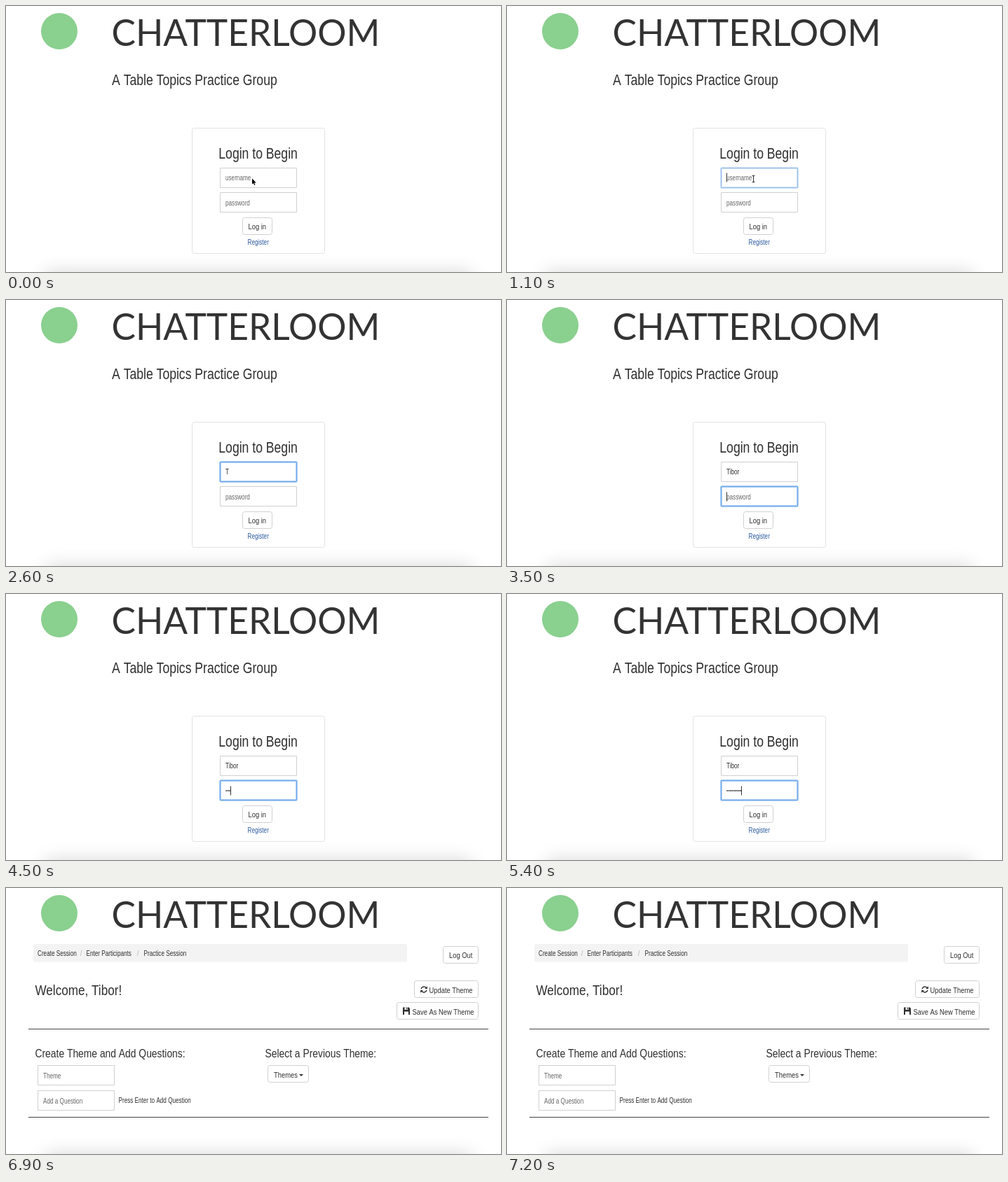
Write an HTML page with a canvas that moves like this. It is 706x380 px and loops after 8 s.

```html
<!DOCTYPE html>
<html lang="en">
<head>
<meta charset="utf-8">
<title>Login demo</title>
<style>
  html, body { margin: 0; width: 100%; height: 100%; overflow: hidden; background: #fff; }
  canvas { display: block; }
</style>
</head>
<body>
<canvas id="stage" width="706" height="380"></canvas>
<script>
const ctx = document.getElementById('stage').getContext('2d');
const LOOP = 8000, NARROW = 0.815, NAME = 'Tibor';
const INK = '#2f2f2f', GREY = '#666', BORDER = '#d0d0d0';
const USER_FIELD = [305.5, 231.5, 109, 28], PASS_FIELD = [305.5, 266.5, 109, 28];
const LOGIN_BUTTON = [337.5, 302.5, 42, 24];
const DOT_STEP = 2.36;
const dotTimes = [4100, 4400, 4500, 4600, 4700, 4800, 5100, 5400, 5400, 5600, 5600];

// The page uses one condensed face, so all body text shares one width factor.
function text(str, x, y, size = 10, color = INK) {
  ctx.save();
  ctx.translate(x, y);
  ctx.scale(NARROW, 1);
  ctx.font = `${size}px "Liberation Sans", Arial, sans-serif`;
  ctx.fillStyle = color;
  ctx.fillText(str, 0, 0);
  const width = ctx.measureText(str).width * NARROW;
  ctx.restore();
  return width;
}

function box([x, y, w, h], { fill = '#fff', stroke = BORDER, radius = 0, line = 1 } = {}) {
  ctx.beginPath();
  ctx.roundRect(x, y, w, h, radius);
  if (fill) { ctx.fillStyle = fill; ctx.fill(); }
  if (stroke) { ctx.strokeStyle = stroke; ctx.lineWidth = line; ctx.stroke(); }
}

function focusRing(rect, alpha = 1) {
  ctx.globalAlpha = alpha;
  box(rect, { fill: null, stroke: '#bcd8f8', radius: 1.5, line: 3 });
  box(rect, { fill: null, stroke: '#74abea', radius: 1, line: 1.4 });
  ctx.globalAlpha = 1;
}

function button(label, rect, textX, textY, fill) {
  box(rect, { radius: 3, fill });
  text(label, textX, textY, 11.5);
}

function path(points, fill, stroke) {
  ctx.beginPath();
  points.forEach(([x, y]) => ctx.lineTo(x, y));
  ctx.closePath();
  if (stroke) { ctx.strokeStyle = stroke; ctx.lineWidth = 1.4; ctx.stroke(); }
  ctx.fillStyle = fill;
  ctx.fill();
}

function rect(x, y, w, h, color = INK) {
  ctx.fillStyle = color;
  ctx.fillRect(x, y, w, h);
}

const caret = (x, y) => rect(x, y, 1, 13, '#333');

function arrow(x, y) {
  path([[0, 0], [0, 8.2], [1.9, 6.5], [3.2, 9.4], [4.4, 8.9], [3.2, 6], [5.8, 6]]
    .map(([dx, dy]) => [x + dx, y + dy]), '#000', '#fff');
}

function iBeam(x, y) {
  rect(x, y, 1, 9);
  rect(x - 1.5, y - 0.5, 4, 1);
  rect(x - 1.5, y + 8.5, 4, 1);
}

function header() {
  rect(0, 0, 706, 380, '#fff');
  ctx.fillStyle = '#8ad08f';
  ctx.beginPath();
  ctx.arc(76, 36, 26, 0, 7);
  ctx.fill();
  ctx.font = '51.5px Lato, sans-serif';
  ctx.fillStyle = '#333';
  ctx.fillText('CHATTERLOOM', 150.5, 56.5);
}

function bottomShadow() {
  ctx.save();
  ctx.shadowColor = 'rgba(0,0,0,.16)';
  ctx.shadowBlur = 26;
  rect(56, 380, 608, 60, '#fff');
  ctx.restore();
}

function userField(t) {
  box(USER_FIELD);
  const focused = t >= 1100 && t < 3500;
  if (focused) focusRing(USER_FIELD, t < 1200 ? 0.5 : 1);
  const typed = t < 2100 ? 0 : t < 2700 ? 1 : Math.min(5, Math.floor((t - 2500) / 100));
  const width = typed ? text(NAME.slice(0, typed), 313, 249) : 0;
  if (!typed) text('username', 313, 249, 10, GREY);
  const blinkOff = (t >= 1600 && t < 2100) || (t >= 2600 && t < 2700);
  if (focused && !blinkOff) caret(313 + Math.round(width), 238.5);
  if (t < 1100) arrow(351, 246.5);
  else if (t < 2000) iBeam(351, 242.5);
}

function passField(t) {
  box(PASS_FIELD);
  const focused = t >= 3500 && t < 6100;
  if (focused) focusRing(PASS_FIELD);
  const dots = dotTimes.filter(time => t >= time).length;
  if (!dots) text('password', 313, 284.5, 10, GREY);
  for (let i = 0; i < dots; i++) {
    ctx.fillStyle = INK;
    ctx.beginPath();
    ctx.arc(314.2 + i * DOT_STEP, 281, 0.9, 0, 7);
    ctx.fill();
  }
  if (focused && !(t >= 4000 && t < 4100)) caret(Math.floor(313 + dots * DOT_STEP), 274.5);
}

function loginPage(t) {
  text('A Table Topics Practice Group', 151, 112.5, 21.6);
  box([265.5, 174.5, 189, 179], { stroke: '#e2e2e2', radius: 3 });
  text('Login to Begin', 303.3, 218, 21.6);
  userField(t);
  passField(t);
  const pressed = t >= 6100;
  button('Log in', LOGIN_BUTTON, 345.5, 319, pressed ? '#e6e6e6' : '#fff');
  if (pressed) focusRing(LOGIN_BUTTON);
  text('Register', 344.5, 341, 10, '#2c5aa0');
}

function refreshIcon(x, y) {
  ctx.strokeStyle = INK;
  ctx.lineWidth = 1.4;
  for (const side of [1, -1]) {
    const turn = side > 0 ? 0 : Math.PI;
    ctx.beginPath();
    ctx.arc(x, y, 4, turn + 3.4, turn + 5.7);
    ctx.stroke();
    path([[4.9, -4.8], [4.9, -0.9], [1.2, -0.9]].map(([dx, dy]) => [x + side * dx, y + side * dy]), INK);
  }
}

function saveIcon(x, y) {
  path([[x, y], [x + 8.5, y], [x + 10, y + 1.5], [x + 10, y + 10.5], [x, y + 10.5]], INK);
  rect(x + 2.5, y, 4.5, 3.5, '#fff');
  rect(x + 5, y + 0.5, 1.3, 2.4);
  rect(x + 2, y + 6, 6, 4.5, '#fff');
}

function sessionPage() {
  box([39, 80, 533, 25.5], { fill: '#f3f3f3', stroke: null, radius: 3 });
  text('Create Session', 45, 97);
  text('/', 106, 97, 10, '#aaa');
  text('Enter Participants', 114.5, 97);
  text('/', 187, 97, 10, '#aaa');
  text('Practice Session', 196.5, 97);
  button('Log Out', [623.5, 83.5, 50, 24], 632, 100);

  text(`Welcome, ${NAME}!`, 41.5, 152.5, 21);
  button('Update Theme', [582.5, 132.5, 91, 24], 603.5, 149.5);
  refreshIcon(596, 145);
  button('Save As New Theme', [557.5, 163.5, 116, 24], 579.5, 180.5);
  saveIcon(566, 170.5);
  rect(32, 201, 656, 1, '#444');

  text('Create Theme and Add Questions:', 41.5, 241.5, 17);
  box([45.5, 253.5, 109, 28]);
  text('Theme', 53, 272, 10, GREY);
  box([45.5, 289.5, 109, 28]);
  text('Add a Question', 53, 307.5, 10, GREY);
  text('Press Enter to Add Question', 160.5, 307);

  text('Select a Previous Theme:', 369.5, 241.5, 17);
  button('Themes', [373.5, 253.5, 58, 24], 382, 270.5);
  path([[418, 266], [424, 266], [421, 269]], INK);
  rect(32, 327, 656, 1, '#444');
}

function draw(now) {
  const t = now % LOOP;
  header();
  if (t < 6900) loginPage(t);
  else sessionPage();
  bottomShadow();
  requestAnimationFrame(draw);
}
requestAnimationFrame(draw);
</script>
</body>
</html>
```
